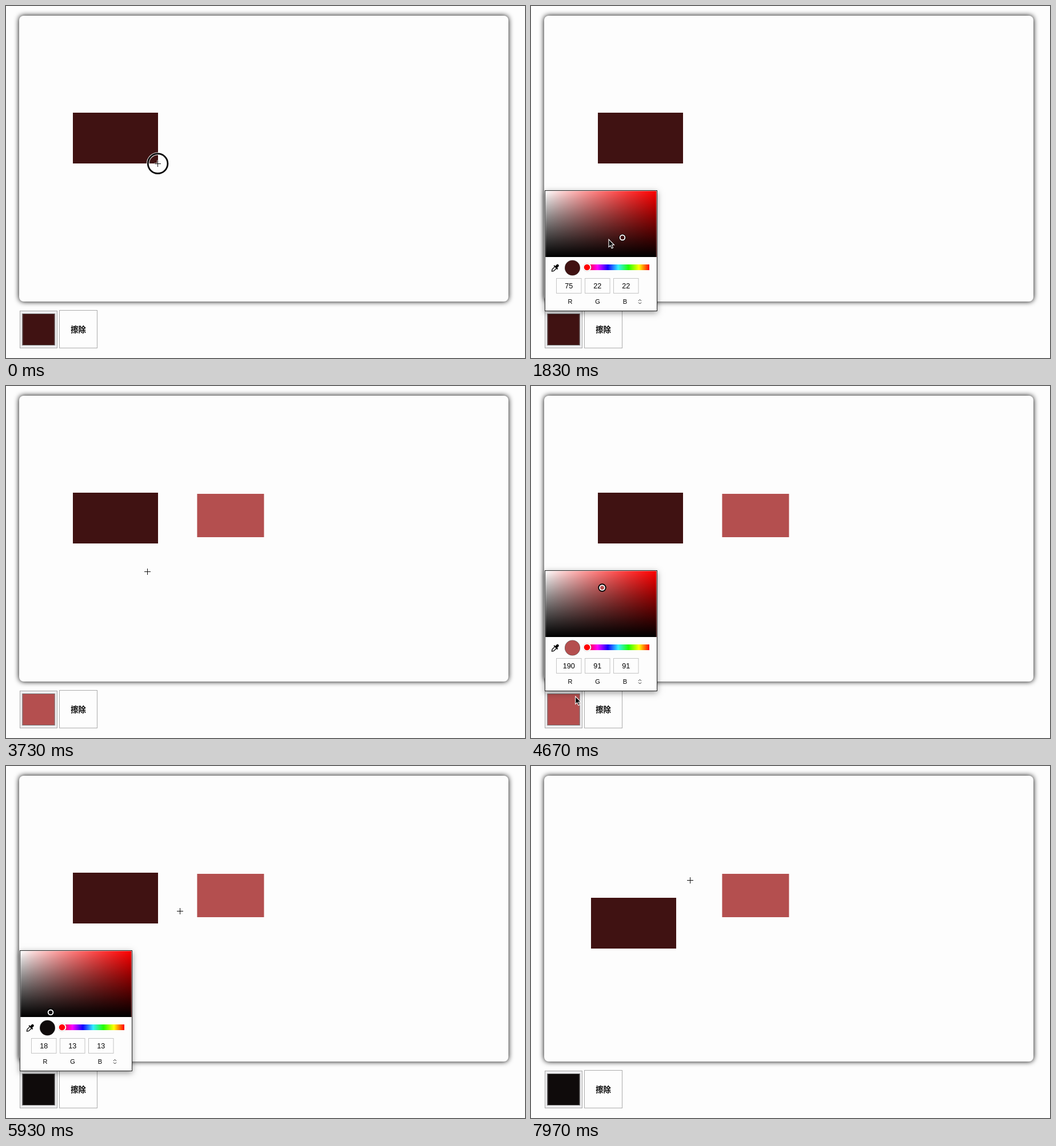
Recreate the animation shown at these times as an HTML page with a canvas. Size 908 px wide and 617 px high, loop 8 s.

```html
<!DOCTYPE html>
<html lang="zh">
<head>
<meta charset="utf-8">
<title>Rectangle drawing board</title>
<style>
html, body { margin: 0; width: 100%; height: 100%; overflow: hidden; background: #fdfdfd; }
canvas { display: block; width: 908px; height: 617px; }
</style>
</head>
<body>
<canvas id="stage" width="908" height="617"></canvas>
<script>
const ctx = document.getElementById('stage').getContext('2d');
const LOOP = 8000;
const PAPER = '#fdfdfd';
const SANS = '"Liberation Sans", Arial, sans-serif';

const MAROON = [75, 22, 22], ROSE = [190, 91, 91], INK = [18, 13, 13];
const first = { x: 117, y: 187, w: 149, h: 89 };
const second = { x: 334.4, y: 189, w: 117, h: 76 };

const drawTime = { start: 2870, end: 3300 };
const dragTime = { start: 6240, end: 7530 };
const grab = { x: 147, y: 61 };

// A pointer move from wherever the last one ended
const move = (start, end, x, y, bend = 0) => ({ start, end, x, y, bend });
const moves = [
  move(0, 0, 265, 276),
  move(230, 1030, 74, 554, .7),
  move(1330, 1830, 136, 409),
  move(1900, 2290, 126, 354),
  move(2400, 2700, 344, 206),
  move(2730, drawTime.start, second.x, second.y),
  move(drawTime.start, drawTime.end, second.x + second.w, second.y + second.h),
  move(3530, 4330, 73, 577, .7),
  move(4600, 5200, 94, 429),
  move(5300, 5550, 77, 432),
  move(5650, 6030, 321, 242),
  move(6070, dragTime.start, first.x + grab.x, first.y + grab.y),
  move(dragTime.start, 6670, 322, 291),
  move(6670, 7050, 422, 329),
  move(7050, 7480, 252, 292),
  move(dragTime.end, 7700, 324, 280),
  move(7730, 7970, 278, 200)
];

const between = (t, a, b) => t >= a && t < b;
const mix = (a, b, u) => a + (b - a) * u;

function progress(t, start, end) {
  const p = end > start ? Math.min(1, Math.max(0, (t - start) / (end - start))) : 1;
  return 1 - (1 - p) ** 2;
}

function pointerAt(t) {
  let i = moves.length - 1;
  while (i > 0 && t < moves[i].start) i--;
  const to = moves[i], from = moves[Math.max(0, i - 1)];
  const u = progress(t, to.start, to.end);
  if (!to.bend) return [mix(from.x, to.x, u), mix(from.y, to.y, u)];
  const cx = mix(from.x, to.x, to.bend);
  return [
    mix(mix(from.x, cx, u), mix(cx, to.x, u), u),
    mix(from.y, mix(from.y, to.y, u), u)
  ];
}

function pickedColor(t) {
  const [a, b, u] = t < 5300
    ? [MAROON, ROSE, progress(t, 2000, 2290)]
    : [ROSE, INK, progress(t, 5300, 5550)];
  return a.map((c, i) => Math.round(mix(c, b[i], u)));
}

// The screen shows midtones a little darker than their nominal value
const tone = c => Math.round(c * (.8 + .00078 * c));
const css = rgb => `rgb(${rgb.map(tone).join()})`;

function disc(x, y, r, fill) {
  ctx.beginPath();
  ctx.arc(x, y, r, 0, 7);
  ctx.fillStyle = fill;
  ctx.fill();
}

function box(x, y, w, h, fill, border) {
  ctx.fillStyle = fill;
  ctx.fillRect(x, y, w, h);
  if (!border) return;
  ctx.lineWidth = 1;
  ctx.strokeStyle = border;
  ctx.strokeRect(x + .5, y + .5, w - 1, h - 1);
}

function line(color, width, ...pts) {
  ctx.beginPath();
  pts.forEach(([x, y]) => ctx.lineTo(x, y));
  ctx.strokeStyle = color;
  ctx.lineWidth = width;
  ctx.stroke();
}

function label(text, x, y, font) {
  ctx.font = font;
  ctx.fillStyle = '#000';
  ctx.textAlign = 'center';
  ctx.fillText(text, x, y);
}

function shadow(color, blur, dy) {
  ctx.shadowColor = color;
  ctx.shadowBlur = blur;
  ctx.shadowOffsetY = dy;
}

function gradient(x0, y0, x1, y1, colors) {
  const g = ctx.createLinearGradient(x0, y0, x1, y1);
  colors.forEach((c, i) => g.addColorStop(i / (colors.length - 1), c));
  return g;
}

function drawBoard() {
  box(0, 0, 908, 617, PAPER);
  ctx.save();
  shadow('#000', 10, 0);
  ctx.beginPath();
  ctx.roundRect(23, 17, 856, 501, 8);
  ctx.fillStyle = PAPER;
  ctx.fill();
  ctx.restore();
}

function drawRects(t) {
  let { x, y, w, h } = first;
  if (t >= dragTime.start) {
    const [px, py] = pointerAt(Math.min(t, dragTime.end - 1));
    x = Math.round(px - grab.x);
    y = Math.round(py - grab.y);
  }
  const u = progress(t, drawTime.start, drawTime.end);
  box(second.x, second.y, second.w * u, second.h * u, css(ROSE));
  box(x, y, w, h, css(MAROON));
}

function drawTools(color) {
  box(24, 534, 66, 66, '#ededef', '#a9a9a9');
  box(28.5, 539, 57, 56, color, '#777');
  box(93, 533, 67, 67, PAPER, '#acacac');
  label('擦除', 126.5, 572, '700 13.33px "Noto Sans CJK SC", "Noto Sans CJK", sans-serif');
}

function drawDropper() {
  ctx.save();
  ctx.translate(42, 459.5);
  ctx.rotate(Math.PI / 4);
  ctx.fillStyle = '#000';
  ctx.beginPath();
  ctx.roundRect(-2.3, -8.5, 4.6, 7, 2);
  ctx.fill();
  ctx.fillRect(-4.5, -3, 9, 2);
  line('#000', 1.3, [-2, -1], [-2, 5], [0, 7.8], [2, 5], [2, -1]);
  ctx.restore();
}

function drawShades() {
  const steps = [0, 1, 2, 3, 4, 5, 6, 7, 8].map(i => i / 8);
  const tints = steps.map(s => css([255, 255 * (1 - s), 255 * (1 - s)]));
  const shades = steps.map(s => `rgba(0,0,0,${1 - tone(255 * (1 - s)) / 255})`);
  box(25.4, 324.4, 194, 115.6, gradient(25, 0, 219, 0, tints));
  box(25.4, 324.4, 194, 115.6, gradient(0, 324, 0, 440, shades));
}

function drawMarker(t, rgb) {
  const [high, low] = rgb;
  const x = 25 + 191 * (1 - low / high), y = 440 - 116 * high / 255;
  disc(x, y, t < 2000 ? 6.2 : 7.2, '#000');
  disc(x, y, 5.3, '#fff');
  disc(x, y, 3.4, css(rgb));
}

function drawHue() {
  const hues = ['#f00', '#f0f', '#10f', '#3ef', '#2f0', '#ff0', '#f00'];
  box(98, 453, 109, 10, gradient(98, 0, 207, 0, hues));
  disc(98, 458, 7.4, '#ccc');
  disc(98, 458, 7, '#fff');
  disc(98, 458, 5.3, '#f00');
}

function drawPicker(t, rgb) {
  ctx.save();
  shadow('rgba(0,0,0,.4)', 10, 3);
  box(24, 323, 197, 212, PAPER);
  ctx.restore();
  box(24, 323, 197, 212, PAPER, '#222');
  drawShades();
  drawMarker(t, rgb);
  drawDropper();
  disc(72.5, 459, 13.5, '#555');
  disc(72.5, 459, 13, css(rgb));
  drawHue();
  rgb.forEach((value, i) => {
    const x = 44 + 50 * i;
    box(x, 477, 44.5, 27, PAPER, '#c4c4c4');
    label(value, x + 22.2, 495, `12.6px ${SANS}`);
    label('RGB'[i], 68.5 + i * 48, 522, `11px ${SANS}`);
  });
  line('#222', 1, [188, 517], [190.5, 514.5], [193, 517]);
  line('#222', 1, [188, 519.5], [190.5, 522], [193, 519.5]);
}

function drawArrow(x, y) {
  const shape = [[0, 0], [0, 13.5], [3, 10.8], [5.3, 15.8], [7.6, 14.8], [5.4, 9.9], [9.5, 9.8]];
  ctx.save();
  ctx.translate(x, y);
  ctx.beginPath();
  shape.forEach(([px, py]) => ctx.lineTo(px, py));
  ctx.closePath();
  ctx.fillStyle = '#000';
  ctx.fill();
  ctx.strokeStyle = '#fff';
  ctx.lineWidth = 1.1;
  ctx.stroke();
  ctx.restore();
}

function drawCross(x, y) {
  const cx = Math.floor(x) + .5, cy = Math.floor(y) + .5;
  [['rgba(255,255,255,.75)', 3, 6], ['#111', 1, 5.5]].forEach(([color, width, arm]) => {
    line(color, width, [cx - arm, cy], [cx + arm, cy]);
    line(color, width, [cx, cy - arm], [cx, cy + arm]);
  });
}

function drawRing(x, y) {
  [['rgba(255,255,255,.85)', 5], ['#0a0a0a', 2.8]].forEach(([color, width]) => {
    ctx.beginPath();
    ctx.arc(x + .6, y + .2, 17.3, 0, 7);
    ctx.strokeStyle = color;
    ctx.lineWidth = width;
    ctx.stroke();
  });
}

function drawPointer(t, pickerOpen) {
  const [x, y] = pointerAt(t);
  const onPicker = pickerOpen && between(x, 24, 221) && between(y, 323, 535);
  const pressed = t < 230 || between(t, 2760, 3530) || between(t, dragTime.start, dragTime.end);
  if (pressed) drawRing(x, y);
  if (y > 518 || onPicker) drawArrow(x, y);
  else drawCross(x, y);
}

function draw(now) {
  const t = now % LOOP;
  const rgb = pickedColor(t);
  const pickerOpen = between(t, 1230, 2740) || between(t, 4500, 6090);
  drawBoard();
  drawRects(t);
  drawTools(css(rgb));
  if (pickerOpen) drawPicker(t, rgb);
  drawPointer(t, pickerOpen);
  requestAnimationFrame(draw);
}

requestAnimationFrame(draw);
</script>
</body>
</html>
```
